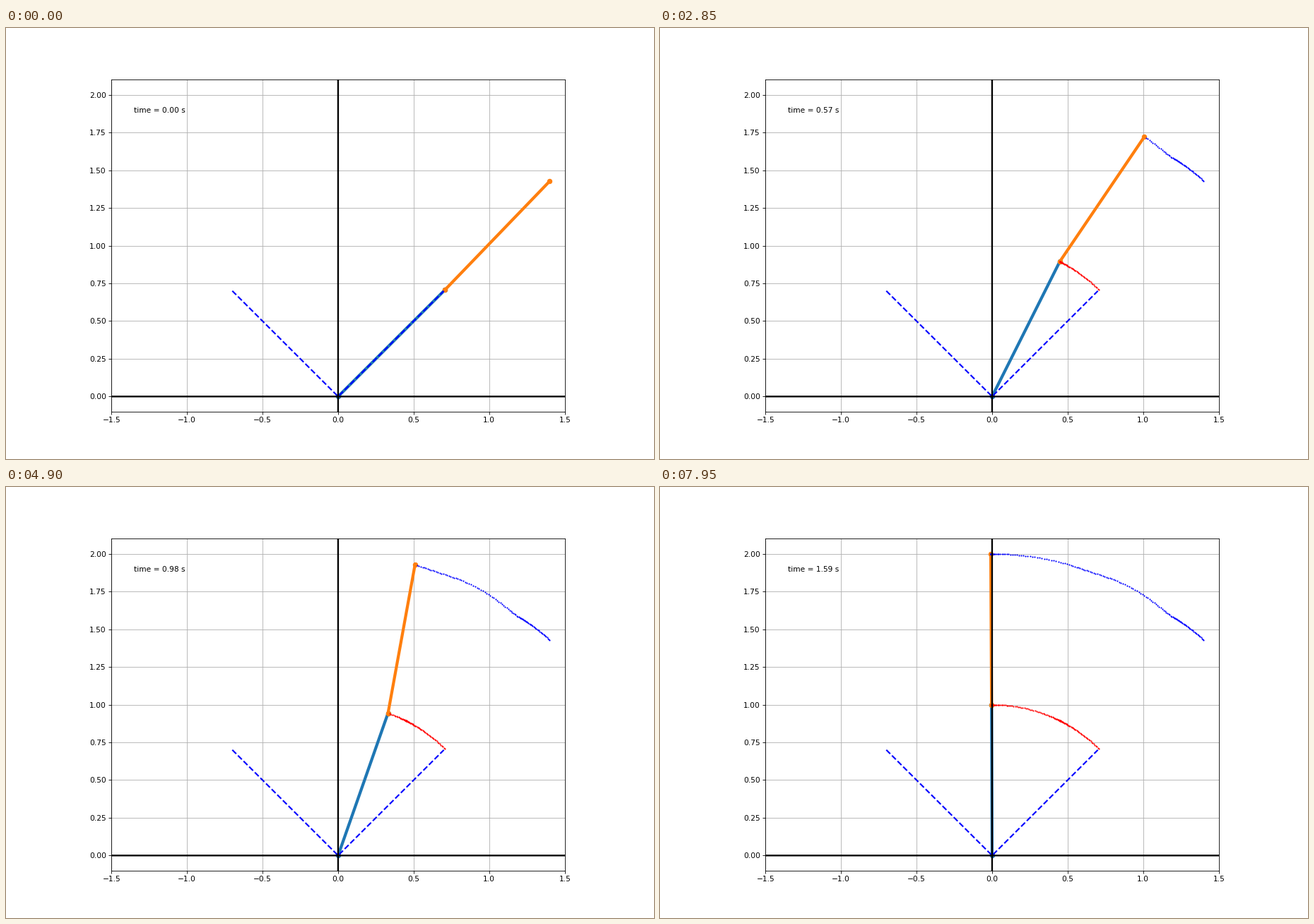
A matplotlib script that plays this animation: 917 by 611 pixels, repeating every 8 s.

```python
import numpy as np
import matplotlib.pyplot as plt
from matplotlib.animation import FuncAnimation

FRAMES = 160
DT = 0.01


def progress(t, start, end):
    return np.clip((t - start) / (end - start), 0, 1)


def ease(t, start, end):
    u = progress(t, start, end)
    return u * u * (3 - 2 * u)


def ease_out(t, end, power):
    return 1 - (1 - progress(t, 0, end)) ** power


# Absolute arm angles: each arm rises to upright in two pushes
t = np.arange(FRAMES) * DT
lower = 45 + 18.4 * ease_out(t, 0.53, 1.6) + 26.8 * ease(t, 0.75, 1.42)
upper = (46.1 - 1.1 * ease_out(t, 0.3, 2)
         + 32 * ease(t, 0.35, 0.91) + 13.3 * ease(t, 0.8, 1.42))
a1, a2 = np.radians(lower), np.radians(upper)
joint = np.column_stack([np.cos(a1), np.sin(a1)])
tip = joint + np.column_stack([np.cos(a2), np.sin(a2)])

fig = plt.figure(figsize=(12.00655, 8), dpi=76.375)
ax = fig.add_subplot(xlim=(-1.5, 1.5), ylim=(-0.1, 2.1))
ax.set_aspect("equal")
ax.grid()

arm1, = ax.plot([], [], "o-", color="C0", lw=4)
arm2, = ax.plot([], [], "o-", color="C1", lw=4)
ax.plot([-0.7, 0, 0.7], [0.7, 0, 0.7], "b--", lw=2)
trail1 = ax.scatter([], [], s=4, color="red", lw=0, zorder=2)
trail2 = ax.scatter([], [], s=4, color="blue", lw=0, zorder=2)
ax.axhline(0, color="black", lw=2.2, snap=False)
ax.axvline(0, color="black", lw=2.2, snap=False)
label = ax.text(0.05, 0.9, "", transform=ax.transAxes)


def draw(i):
    arm1.set_data([0, joint[i, 0]], [0, joint[i, 1]])
    arm2.set_data(*zip(joint[i], tip[i]))
    trail1.set_offsets(joint[:i])
    trail2.set_offsets(tip[:i])
    label.set_text(f"time = {i * DT:.2f} s")
    return arm1, arm2, trail1, trail2, label


anim = FuncAnimation(fig, draw, frames=FRAMES, init_func=lambda: draw(0),
                     interval=50, repeat=True, repeat_delay=0)
plt.show()
```
